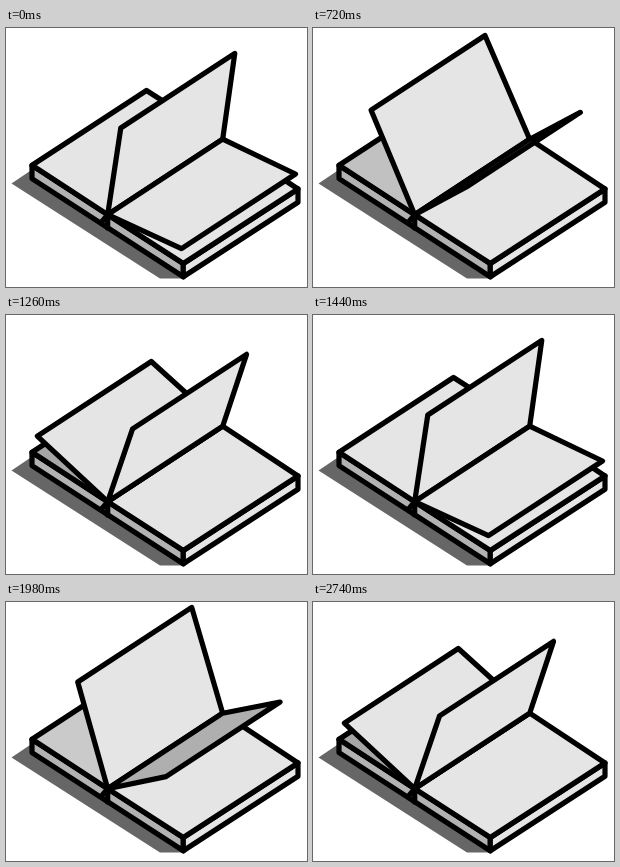
Animation of 301 by 259 pixels, one loop 2.78 s. Source, as an HTML page with a canvas:

```html
<!DOCTYPE html>
<html lang="en">
<head>
<meta charset="utf-8">
<title>Turning pages</title>
<style>
html, body { margin: 0; width: 100%; height: 100%; overflow: hidden; background: #fff; }
canvas { display: block; }
</style>
</head>
<body>
<canvas id="c" width="301" height="259"></canvas>
<script>
const ctx = document.getElementById('c').getContext('2d');
const LOOP = 2780, STEP = 180, POSES = 8;

const add = (a, b) => [a[0] + b[0], a[1] + b[1]];
const grey = v => `rgb(${v},${v},${v})`;

// Spine, and the corners of both halves around it
const FRONT = [101.7, 186.7], BACK = [216.7, 111.2];
const LEFT = [26, 137.3], NEAR = [177.3, 235.5], RIGHT = [292, 161];
const FAR = [140.5, 62.5];
const DEPTH = [0, 13.3];
const EDGE = [-114, 74.6];            // page: back corner to front corner

const PAPER = 229, SIDE = 178, SHADOW = 102;

// Path of a page's back corner: a spline with a key every three poses,
// the first and last only steer the ends
const KEY_GAP = 3;
const KEYS = [
  [305, 192], [289.5, 146], [274, 100], [251, 54],
  [216, 15], [172, 7.5], [145.3, 46.5], [146, 85]
];

function spline(a, b, c, d, u) {
  return b + u / 2 * (c - a + u * (2 * a - 5 * b + 4 * c - d + u * (3 * (b - c) + d - a)));
}

function corner(pose) {
  const i = Math.min(Math.floor(pose / KEY_GAP), KEYS.length - 4);
  const u = pose / KEY_GAP - i;
  return [0, 1].map(n => spline(...KEYS.slice(i, i + 4).map(k => k[n]), u));
}

// The right page dims until it is seen edge-on, then shows its lit back
const rightTone = pose => pose < 5 ? PAPER - 6 * pose * pose : PAPER;
const leftTone = pose => PAPER - 9 * pose;

function shape(points, tone, stroke = true) {
  ctx.beginPath();
  points.forEach(p => ctx.lineTo(...p));
  ctx.closePath();
  ctx.fillStyle = grey(tone);
  ctx.fill();
  if (stroke) ctx.stroke();
}

function line(a, b) {
  ctx.beginPath();
  ctx.moveTo(...a);
  ctx.lineTo(...b);
  ctx.stroke();
}

const side = (a, b, tone) => shape([a, b, add(b, DEPTH), add(a, DEPTH)], tone);

function page(pose, tone) {
  const back = corner(pose);
  shape([FRONT, add(back, EDGE), back, BACK], tone);
}

function book(pose) {
  shape([[5.5, 155.5], [27, 141], [178, 250.5], [154, 250.5]], SHADOW, false);
  side(LEFT, NEAR, SIDE);
  side(NEAR, RIGHT, PAPER);
  shape([LEFT, FAR, BACK, FRONT], leftTone(pose));
  shape([FRONT, BACK, RIGHT, NEAR], PAPER);
  line(FRONT, add(FRONT, DEPTH));
  line(add(FRONT, [-5.5, 6.5]), FRONT);
}

function draw(t) {
  const pose = Math.floor((t % LOOP) / STEP) % POSES;
  ctx.fillStyle = '#fff';
  ctx.fillRect(0, 0, 301, 259);
  ctx.strokeStyle = '#000';
  ctx.lineWidth = 5.2;
  ctx.lineJoin = ctx.lineCap = 'round';
  book(pose);
  page(pose + POSES, PAPER);
  page(pose, rightTone(pose));
}

const start = performance.now();
function tick() {
  draw(performance.now() - start);
  requestAnimationFrame(tick);
}
tick();
</script>
</body>
</html>
```
